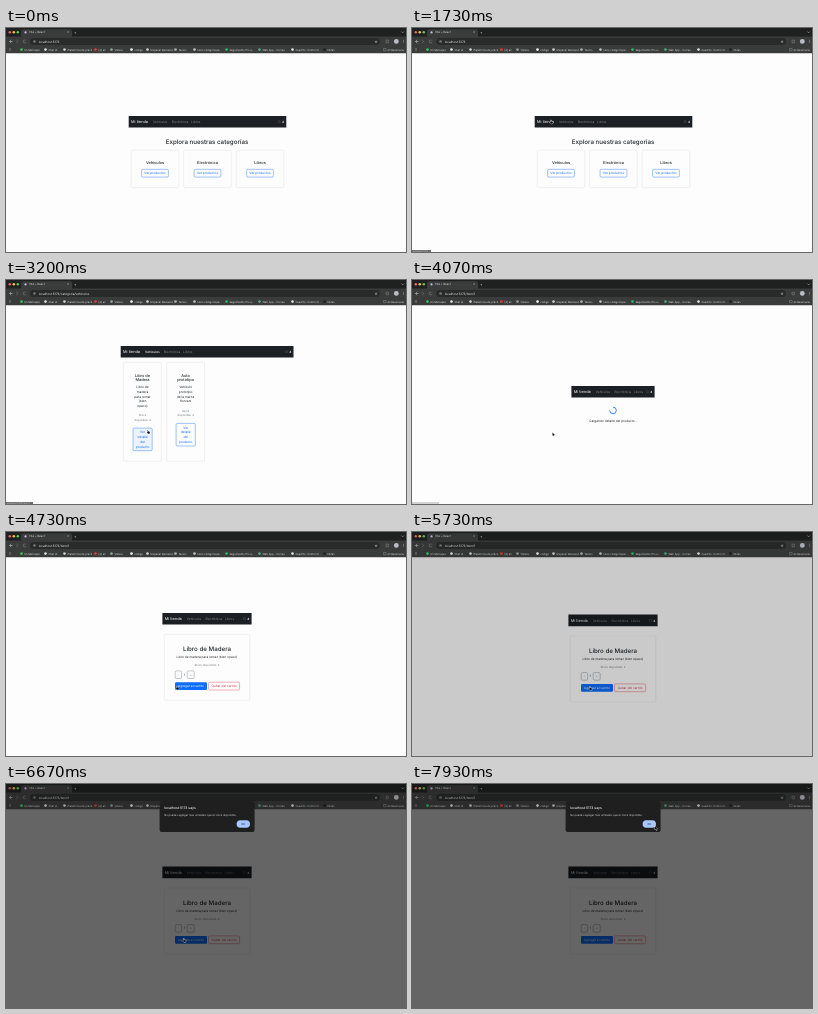
Write an HTML page with a canvas that moves like this. It is 400 px wide and 224 px high and loops after 8000 ms.

```html
<!DOCTYPE html>
<html lang="es">
<head>
<meta charset="utf-8">
<style>
html, body { margin: 0; width: 100%; height: 100%; overflow: hidden; background: #fff; }
canvas { display: block; width: 400px; height: 224px; }
</style>
</head>
<body>
<canvas id="stage"></canvas>
<script>
const LOOP = 8000;
const BLUE = '#0d6efd', RED = '#dc3545', INK = '#212529', GREY = '#777b80', PAPER = '#fdfdfd';
const canvas = document.getElementById('stage');
const ctx = canvas.getContext('2d');
const ratio = window.devicePixelRatio || 1;
canvas.width = 400 * ratio;
canvas.height = 224 * ratio;
ctx.scale(ratio, ratio);
ctx.textRendering = 'geometricPrecision';
ctx.textBaseline = 'middle';

const progress = (t, from, to) => Math.min(1, Math.max(0, (t - from) / (to - from)));
const ease = p => p * p * (3 - 2 * p);

function box(x, y, w, h, { fill, stroke, r = 0, line = 0.3 }) {
  ctx.beginPath();
  ctx.roundRect(x, y, w, h, r);
  if (fill) { ctx.fillStyle = fill; ctx.fill(); }
  if (stroke) { ctx.strokeStyle = stroke; ctx.lineWidth = line; ctx.stroke(); }
}

function dot(x, y, r, color) {
  ctx.beginPath();
  ctx.arc(x, y, r, 0, 7);
  ctx.fillStyle = color;
  ctx.fill();
}

function path(points, color, line = 0.5) {
  ctx.beginPath();
  points.forEach(([x, y]) => ctx.lineTo(x, y));
  ctx.strokeStyle = color;
  ctx.lineWidth = line;
  ctx.stroke();
}

function text(str, x, y, size = 3.2, color = INK, align = 'left', weight = 400) {
  ctx.font = `${weight} ${size}px Inter, "Liberation Sans", sans-serif`;
  ctx.textAlign = align;
  ctx.fillStyle = color;
  ctx.fillText(str, x, y);
}

const centered = (str, x, y, size, color, weight) => text(str, x, y, size, color, 'center', weight);

function lines(list, x, y, size, color, weight, step = 4.7) {
  list.forEach((str, i) => centered(str, x, y + i * step, size, color, weight));
}

const card = (x, y, w, h) => box(x, y, w, h, { fill: PAPER, stroke: '#dcddde', r: 1.2, line: 0.4 });

function outlineButton(list, x, y, w, h, color = BLUE, fill = PAPER) {
  box(x, y, w, h, { fill, stroke: color, r: 1.2, line: 0.4 });
  lines(list, x + w / 2, y + h / 2 - (list.length - 1) * 2.35 + 0.1, 3.2, color);
}

// Browser frame
const bookmarks = [
  [14, 'En Mensajes', '#35c759'], [38, 'Chat IA', '#ddd'], [57, 'Plataforma de prácti…', '#ccc'],
  [88, '[4] all', '#e33b32'], [104, 'Vídeos', '#999'], [124, 'código', '#eee'],
  [140, 'Empezar Backend…', '#ccc'], [168, 'Textos', '#aaa'], [187, 'Libro código Expe…', '#bbb'],
  [219, 'Seguimiento Pro a…', '#2fb56b'], [252, 'Web App - Correo', '#55a87a'],
  [285, 'Cuadrito: Control C…', '#ddd'], [317, 'Notas', '#222']
];

function browser(url) {
  box(0, 0, 400, 9, { fill: '#1f2020' });
  box(0, 8.5, 400, 16.7, { fill: '#3a3b3b' });
  box(15, 1.2, 51, 9, { fill: '#3a3b3b', r: 2 });
  ['#ed6a5e', '#f4bf4f', '#61c554'].forEach((c, i) => dot(3.8 + i * 4, 4.2, 1.25, c));
  dot(19.5, 4.4, 1.1, '#c9bdf2');
  text('Vite + React', 23, 4.5, 2.75, '#e4e4e4');
  text('×', 62, 4.4, 3.4, '#ccc', 'center');
  text('+', 69.3, 4.4, 4, '#ccc', 'center');
  path([[395.5, 3.6], [396.7, 4.8], [397.9, 3.6]], '#ccc');
  path([[5.3, 11.9], [3.6, 13.5], [5.3, 15.1]], '#ddd');
  path([[3.6, 13.5], [6.6, 13.5]], '#ddd');
  path([[10.2, 11.9], [11.9, 13.5], [10.2, 15.1]], '#888');
  ctx.beginPath();
  ctx.arc(18.6, 13.5, 1.5, 0.3, 5.6);
  ctx.stroke();
  box(24, 10, 350, 7, { fill: '#292a2a', r: 3.5 });
  dot(28.5, 13.5, 1.3, '#777');
  text(url, 32.7, 13.6, 3.1, '#e6e6e6');
  text('☆', 370, 13.5, 3.5, '#ccc', 'center');
  box(380, 12.2, 2.4, 2.6, { stroke: '#ccc', r: 0.4 });
  dot(390.3, 13.4, 2.4, '#b9bfc5');
  [-1.3, 0, 1.3].forEach(d => dot(397.5, 13.5 + d, 0.35, '#ddd'));
  text('⠿', 4, 21.6, 3.2, '#ccc', 'center');
  for (const [x, label, color] of bookmarks) {
    dot(x + 1.5, 21.6, 1.35, color);
    text(label, x + 4.4, 21.8, 2.6, '#dedede');
  }
  box(377.5, 20.5, 2.7, 2.2, { stroke: '#ccc', r: 0.3 });
  text('All Bookmarks', 381.5, 21.8, 2.5, '#ddd');
}

function navbar(x, y, w, active = '') {
  box(x + 0.4, y + 0.6, w - 0.8, 11.7, { fill: '#1c1f23' });
  const mid = y + 6.6;
  text('Mi tienda', x + 2.8, mid, 3.9, '#fff');
  [['Vehículos', 24.8], ['Electrónica', 43.4], ['Libros', 63]].forEach(([label, dx]) => {
    const on = label === active;
    text(label, x + dx, mid, 3.15, on ? '#fff' : '#8b8d90', 'left', on ? 500 : 400);
  });
  box(x + w - 8.7, mid - 1.1, 2.3, 1.8, { stroke: '#777', r: 0.3 });
  text('4', x + w - 3.6, mid, 3.1, '#fff', 'center', 600);
}

// Pages
function home() {
  navbar(122.3, 87.3, 158.4);
  centered('Explora nuestras categorías', 201, 114, 6.2, INK, 500);
  ['Vehículos', 'Electrónica', 'Libros'].forEach((name, i) => {
    const x = 149 + i * 52.5;
    card(x - 23.8, 122.2, 47.6, 37.5);
    centered(name, x, 135.2, 3.9, INK, 500);
    outlineButton(['Ver productos'], x - 13.4, 141.3, 26.8, 7.8);
  });
}

function product(x, title, description, stockY, hovered) {
  card(x - 18.9, 82.3, 37.8, 99);
  lines(title, x, 95.4, 3.9, INK, 500, 4.8);
  lines(description, x, 107.4, 3.2, INK);
  lines(['Stock', 'disponible: 4'], x, stockY, 2.75, GREY, 400, 4.6);
  outlineButton(['Ver', 'detalle', 'del', 'producto'], x - 9.5, stockY + 12.7, 19.2, 22.6, BLUE, hovered ? '#edf3fc' : PAPER);
}

function products(t) {
  navbar(114.3, 65.3, 173.6, 'Vehículos');
  product(136.5, ['Libro de', 'Madera'], ['Libro de', 'madera', 'para remar', '(bien', 'opaco)'], 135.4, t > 3000);
  product(179.6, ['Auto', 'prototipo'], ['Vehículo', 'prototipo', 'de la marca', 'Korvani'], 130.7);
}

function loading(t, label) {
  navbar(159, 105.3, 84);
  const start = Math.PI * 1.5 + (t - 4070) / 750 * Math.PI * 2;
  ctx.beginPath();
  ctx.arc(201, 130.4, 3.3, start, start + Math.PI * 1.5);
  ctx.strokeStyle = BLUE;
  ctx.lineWidth = 0.85;
  ctx.stroke();
  centered(label, 201.3, 141, 3.2);
}

function detail() {
  navbar(156, 80.3, 90);
  card(158.3, 102.3, 85.5, 66);
  centered('Libro de Madera', 201, 117, 6.2, INK, 500);
  centered('Libro de madera para remar (bien opaco)', 201, 125.1, 3.15);
  centered('Stock disponible: 4', 201, 133.1, 2.75, GREY);
  outlineButton(['-'], 169.2, 138.9, 6.4, 7.6, '#6c757d');
  centered('1', 178.4, 142.7, 3.1);
  outlineButton(['+'], 181.2, 138.9, 7, 7.6, '#6c757d');
  box(169, 150.2, 32, 7.8, { fill: BLUE, r: 1.2 });
  centered('Agregar al carrito', 185, 154.2, 3.15, '#fff');
  outlineButton(['Quitar del carrito'], 202.6, 150.2, 31, 7.8, RED);
}

function alertBox(p) {
  const shade = 31 + 140 * (1 - p);
  ctx.save();
  ctx.globalAlpha = p;
  ctx.translate(0, -5 * (1 - p));
  box(153.6, 17, 95, 31, { fill: `rgb(${shade},${shade},${shade})`, r: 2.6 });
  text('localhost:5173 says', 158.2, 24.2, 3.4, '#f0f0f0', 'left', 500);
  text('No puedes agregar más unidades que el stock disponible.', 158.2, 30.8, 2.65, '#d6d6d6');
  box(230.6, 36.2, 13.4, 7.6, { fill: '#a8c7fa', r: 3.8 });
  centered('OK', 237.3, 40.1, 2.7, '#17315c', 500);
  ctx.restore();
}

// Pointer: time, x, y
const route = [
  [70, 262, 167], [870, 215, 130], [1530, 138, 92], [1730, 138, 92], [1900, 153, 93],
  [2530, 153, 93], [3100, 141, 150], [3750, 141, 150], [4070, 140.5, 152.5],
  [4250, 140.5, 152.5], [4700, 170, 154], [5300, 177, 154.5], [7270, 177, 154.5], [7900, 243, 42.5]
];
const arrow = new Path2D('M0 0V4.2L1 3.3L1.7 4.8L2.4 4.5L1.7 3.1H3Z');
const hand = new Path2D('M.7 0Q1.3-.3 1.4.4V1.7L3.2 2.1Q3.6 2.3 3.5 3L3.1 4.7H1.2L-.1 2.9Q.1 2.4.8 2.9Z');

function pointer(t) {
  if (t < route[0][0]) return;
  let i = route.findIndex(stop => stop[0] > t);
  if (i < 0) i = route.length;
  const a = route[i - 1], b = route[i] || a;
  const p = a === b ? 1 : ease(progress(t, a[0], b[0]));
  const overLink = (t > 1450 && t < 1950) || (t > 3000 && t < 3740) || (t > 4650 && t < 7350);
  const shape = overLink ? hand : arrow;
  ctx.save();
  ctx.translate(a[1] + (b[1] - a[1]) * p, a[2] + (b[2] - a[2]) * p);
  ctx.scale(0.8, 0.8);
  ctx.strokeStyle = '#fff';
  ctx.lineWidth = 0.8;
  ctx.stroke(shape);
  ctx.fillStyle = '#111';
  ctx.fill(shape);
  ctx.restore();
}

function statusBar(label, width, alpha) {
  ctx.globalAlpha = alpha;
  box(0, 222, width, 2, { fill: '#6a6b6c' });
  text(label, 0.8, 223.2, 2.3, '#ccc');
  ctx.globalAlpha = 1;
}

function draw(t) {
  box(0, 0, 400, 224, { fill: PAPER });
  const dim = progress(t, 5670, 5850);
  ctx.save();
  if (dim > 0) ctx.translate(0, 1.7);
  if (t < 1950) home();
  else if (t < 2450) loading(t, 'Cargando productos...');
  else if (t < 3740) products(t);
  else if (t < 4480) loading(t, 'Cargando detalle del producto...');
  else detail();
  ctx.restore();

  if (t > 1450 && t < 2450) statusBar('localhost:5173', 19, 1 - progress(t, 1950, 2450));
  if (t > 3000 && t < 4300) statusBar('localhost:5173/item/1', 27, 1 - progress(t, 3740, 4200));
  box(0, 25, 400, 199, { fill: `rgba(0,0,0,${0.6 * dim})` });
  const address = t < 1950 ? '' : t < 3740 ? '/categoria/vehiculos' : '/item/1';
  browser('localhost:5173' + address);
  box(0, 0, 400, 25.2, { fill: `rgba(0,0,0,${0.25 * dim})` });
  const open = progress(t, 5810, 5990);
  if (open > 0) alertBox(open);
  pointer(t);
}

const begin = performance.now();
function tick() {
  draw((performance.now() - begin) % LOOP);
  requestAnimationFrame(tick);
}
tick();
</script>
</body>
</html>
```
